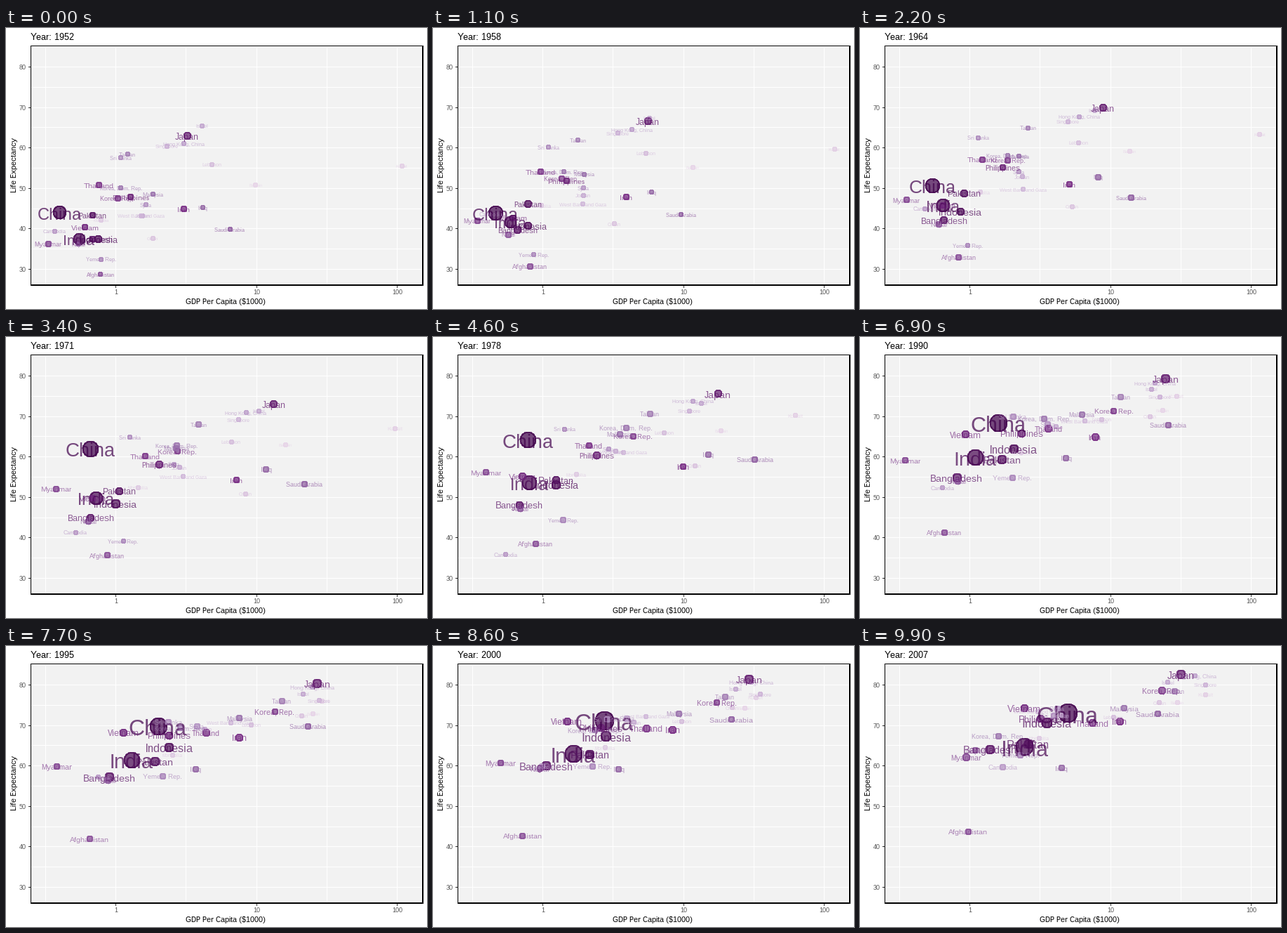
A matplotlib script for the animation above (10000 ms loop, 600x400 px).

```python
import numpy as np
import matplotlib.pyplot as plt
from matplotlib.animation import FuncAnimation
from matplotlib.colors import LinearSegmentedColormap
from matplotlib.patches import Rectangle

plt.rcParams.update({
    "font.family": "Liberation Sans",
    "text.hinting": "native",
    "text.hinting_factor": 1,
})

FRAMES, INTERVAL = 100, 100
PX = 0.72                                   # points per pixel at 100 dpi
LEFT, RIGHT, TOP, BOTTOM = 35, 594, 25, 365.9
POP_MIN, POP_MAX = 0.12, 1319
T = np.linspace(0, 1, FRAMES)               # 1952 to 2007
countries = []


def padded(lo, hi):
    pad = 0.05 * (hi - lo)
    return lo - pad, hi + pad


X_LO, X_HI = padded(np.log10(0.331), np.log10(113.523))
Y_LO, Y_HI = padded(28.801, 82.603)


def to_x(log_gdp):
    return LEFT + (log_gdp - X_LO) / (X_HI - X_LO) * (RIGHT - LEFT)


def to_y(life):
    return BOTTOM - (life - Y_LO) / (Y_HI - Y_LO) * (BOTTOM - TOP)


def glide(points):
    """Smooth cubic path through points evenly spaced in time."""
    p = np.asarray(points, float)
    m = np.gradient(p, edge_order=2)
    u = T * (len(p) - 1)
    i = np.minimum(u.astype(int), len(p) - 2)
    f = u - i
    s = f * f * (3 - 2 * f)
    return (p[i] * (1 - s) + p[i + 1] * s
            + m[i] * f * (1 - f) ** 2 - m[i + 1] * f * f * (1 - f))


def add(name, pop, *stops, growth=2.7):
    """Final population in millions, then (GDP in dollars, life) stops."""
    gdp, life = zip(*stops)
    people = pop * growth ** (T - 1)
    share = np.clip((people - POP_MIN) / (POP_MAX - POP_MIN), 0, 1)
    countries.append((name, to_x(glide(np.log10(gdp) - 3)),
                      to_y(glide(life)), 2 + 10 * np.sqrt(share)))


# Largest population first: the colour ramp follows this order.
add("China", 1319, (400, 44), (500, 46), (650, 61.5), (850, 64.7),
    (1470, 67.9), (2400, 70.7), (4959, 73), growth=2.37)
add("India", 1110, (547, 37.4), (716, 49.5), (1036, 59.1), (2452, 64.7), growth=3)
add("Indonesia", 224, (750, 37.5), (980, 48.1), (1938, 61), (3541, 70.7))
add("Pakistan", 169, (685, 43.4), (1303, 55.1), (2606, 65.5), growth=4)
add("Bangladesh", 150, (684, 37.5), (659, 44.7), (780, 53.9), (1391, 64.1), growth=3.2)
add("Japan", 127, (3217, 63), (12900, 72.8), (23770, 78.9), (31656, 82.6), growth=1.47)
add("Philippines", 91, (1273, 47.8), (1771, 56), (2485, 61.1), (2342, 67), (3190, 71.7))
add("Vietnam", 85, (605, 40.4), (678, 49.4), (876, 64.4), (2442, 74.2))
add("Iran", 69, (3035, 44.9), (5440, 51.7), (10400, 58.7), (7490, 66.3), (11606, 71))
add("Thailand", 65, (758, 50.8), (2300, 63.5), (7458, 70.6))
add("Korea, Rep.", 49, (1031, 47.5), (2652, 61), (9590, 70.6), (23348, 78.6))
add("Myanmar", 48, (331, 36.3), (358, 48.3), (396, 57.1), (362, 59.6), (944, 62.1))
add("Afghanistan", 32, (779, 28.8), (840, 33.5), (877, 39.1), (646, 41.7), (975, 43.8))
add("Nepal", 29, (546, 36.2), (706, 48.2), (1091, 63.8))
add("Saudi Arabia", 28, (6460, 39.9), (15400, 48.9), (33900, 60.9), (23700, 69.2), (21655, 72.8))
add("Iraq", 27, (4130, 45.3), (8780, 53.7), (14600, 61.2), (3900, 59.3), (4471, 59.5))
add("Malaysia", 25, (1831, 48.5), (2645, 61.8), (5850, 69.9), (12452, 74.2))
add("Korea, Dem. Rep.", 23, (1088, 50.1), (1990, 59.1), (4106, 68.1), (3050, 69.4), (1593, 67.3))
add("Taiwan", 23, (1207, 58.5), (6440, 71.4), (28718, 78.4))
add("Yemen, Rep.", 22, (782, 32.5), (1113, 38.9), (1947, 53.8), (2281, 62.7))
add("Sri Lanka", 20, (1084, 57.6), (1491, 67.4), (3970, 72.4))
add("Syria", 19, (1643, 45.9), (3040, 62.9), (4185, 74.1))
add("Cambodia", 14, (368, 39.4), (490, 44.9), (555, 36), (700, 56), (1714, 59.7))
add("Hong Kong, China", 7, (3054, 61), (12760, 74.5), (39725, 82.2))
add("Israel", 6.4, (4087, 65.4), (14300, 73.8), (25523, 80.7))
add("Jordan", 6, (1547, 43.2), (3440, 62.4), (4519, 72.5))
add("Singapore", 4.6, (2315, 60.4), (7168, 69), (20680, 74.3), (47143, 80))
add("West Bank and Gaza", 4, (1516, 43.2), (2530, 50.8), (4000, 62.6), (6700, 70.1), (3025, 73.4))
add("Lebanon", 3.9, (4835, 55.9), (7500, 66.5), (10461, 72))
add("Oman", 3.2, (1828, 37.6), (8100, 50.4), (18280, 68.9), (22316, 75.6))
add("Mongolia", 2.9, (787, 42.2), (1815, 56.5), (3096, 66.8))
add("Kuwait", 2.5, (108382, 55.6), (98900, 66.7), (30230, 74.5), (47307, 77.6))
add("Bahrain", 0.7, (9867, 50.9), (19270, 67.3), (29796, 75.6))

ramp = LinearSegmentedColormap.from_list(
    "asia", ["#40004B", "#762A83", "#9970AB", "#C2A5CF", "#E7D4E8"])
shades = ramp(np.linspace(0, 1, len(countries)), alpha=0.7)
order = sorted(range(len(countries)), key=lambda i: countries[i][0])
countries = [countries[i] for i in order]
shades = shades[order]

fig = plt.figure(figsize=(6, 4), dpi=100, facecolor="white")
ax = fig.add_axes([0, 0, 1, 1])
ax.set(xlim=(0, 600), ylim=(400, 0))
ax.axis("off")


def box(x, y, w, h, color, z=1):
    ax.add_patch(Rectangle((x, y), w, h, fc=color, lw=0, zorder=z))


def label(x, y, text, px, color="black", **kw):
    kw = {"ha": "center", "va": "baseline", **kw}
    return ax.text(x, y, text, fontsize=px * PX, color=color, **kw)


# Panel, grid, ticks and border
box(35, 25, 559, 341, "#F2F2F2", 0)
for e in np.arange(-0.5, 2.1, 0.5):
    x = int(to_x(e))
    box(x, 25, 1, 341, "white")
    if e % 1 == 0:
        box(x, 367, 1, 3, "#333333")
        label(x + 0.5, 379, f"{10 ** e:.0f}", 9, "#4D4D4D")
for life in range(30, 86, 5):
    y = int(to_y(life))
    box(35, y, 559, 1, "white")
    if life % 10 == 0:
        box(32, y, 3, 1, "#333333")
        label(29, y + 4, str(life), 9, "#4D4D4D", ha="right")
box(35, 25, 560, 1, "black", 5)
box(35, 365, 560, 2, "black", 5)
box(35, 25, 1, 342, "black", 5)
box(593, 25, 2, 342, "black", 5)

title = label(35, 17, "", 13, ha="left")
label(313.5, 393, "GDP Per Capita ($1000)", 11)
label(12.5, 195.5, "Life Expectancy", 11, va="center", rotation=90)

names = [c[0] for c in countries]
xs, ys, sizes = (np.array([c[k] for c in countries]) for k in (1, 2, 3))
dots = ax.scatter(xs[:, 0], ys[:, 0], c=shades, edgecolors=shades,
                  linewidths=PX, antialiased=False, zorder=2)
tags = [label(0, 0, n, 6, s, zorder=3) for n, s in zip(names, shades)]


def update(i):
    title.set_text(f"Year: {round(1952 + 55 * T[i])}")
    em = sizes[:, i] * 72.27 / 25.4
    radius = np.floor(0.375 * (em + 0.945) + 0.5)
    dots.set_offsets(np.floor(np.column_stack([xs[:, i], ys[:, i]])) + 0.5)
    dots.set_sizes((2 * radius * PX) ** 2)
    for tag, x, y, px in zip(tags, xs[:, i], ys[:, i], np.floor(em + 0.5)):
        tag.set_position((x - 0.03 * px, y + 0.41 * px))
        tag.set_fontsize(px * PX)
    return [title, dots, *tags]


anim = FuncAnimation(fig, update, frames=FRAMES, interval=INTERVAL, repeat=True)
plt.show()
```
